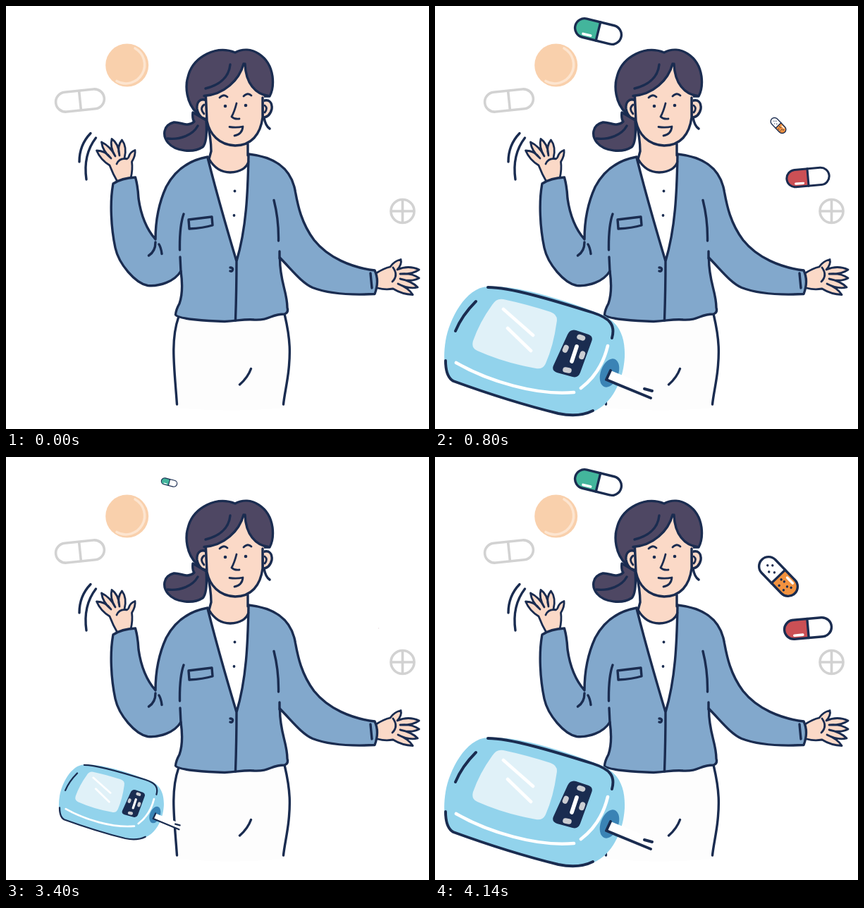
Recreate the animation shown at these times as an HTML page. Size 600 px wide and 600 px high, loop 6000 ms.

```html
<!DOCTYPE html>
<html lang="en">
<head>
<meta charset="utf-8">
<title>Health consultant</title>
<style>
  html, body { margin: 0; width: 100%; height: 100%; overflow: hidden; background: #fff; }
  svg { display: block; width: 100%; height: 100%; }
  .line { fill: none; stroke: #1a2c50; stroke-width: 3.4; stroke-linecap: round; stroke-linejoin: round; }
  .thin { stroke-width: 2.8; }
  .shine { fill: none; stroke: #fff; stroke-width: 4.6; stroke-linecap: round; }
  .small { stroke-width: 3.6; }
  .grey { fill: none; stroke: #d2d2d2; stroke-width: 3.6; }
  .navy { fill: #1a2c50; }
  .white { fill: #fff; }
  .skin { fill: #fbd9c7; }
  .hair { fill: #4e4763; }
  .blue { fill: #82a8cc; }
</style>
</head>
<body>
<svg viewBox="0 0 600 600">
  <defs>
    <g id="capsule">
      <rect class="white" x="-33.5" y="-13.5" width="67" height="27" rx="13.5"/>
      <path fill="currentColor" d="M0-13.5H-20a13.5 13.5 0 0 0 0 27H0z"/>
      <rect class="line" x="-33.5" y="-13.5" width="67" height="27" rx="13.5"/>
      <path class="line" d="M0-13.5V13.5"/>
    </g>
  </defs>

  <!-- Background ornaments -->
  <circle cx="171.7" cy="84" r="30.5" fill="#f9d0ac"/>
  <path d="M183 60A26.5 26.5 0 0 1 157 106.5" fill="none" stroke="#fde5d0" stroke-width="3.6" stroke-linecap="round"/>
  <g class="grey">
    <g transform="translate(105 134) rotate(-6)">
      <rect x="-34.5" y="-14" width="69" height="28" rx="14"/>
      <path d="M0-14V14"/>
    </g>
    <circle cx="562.5" cy="291" r="16.5"/>
    <path d="M546 291H579M562.5 275V307"/>
  </g>

  <!-- Skirt -->
  <path fill="#fdfdfd" d="M245 440C234 475 238 510 243 570Q320 577 393 570C399 535 403 505 402 475L395 438z"/>
  <path class="line" d="M244.5 442C233 475 239 515 242.5 565M395.5 439C404 475 403 495 401 515C399 535 395 550 393.5 565M347.5 514.5Q343 527 331.5 537"/>

  <!-- Hands -->
  <path class="line thin skin" d="M158 249Q152 239 147 226Q134 218 128.5 205Q141 205 149 216Q137 206 135.500 193Q148 199 155 213Q147 200 150 188.500Q160 195 161 212Q157 199 164.500 190Q172 200 168 216Q173 218 174 214Q176 207 183 204.500Q184 212 178.500 221Q180 232 177 244"/>
  <path class="line thin" d="M157 224Q161 215 171 217"/>
  <path class="line thin skin" d="M525 379Q536 372 545 370Q550 362 560 359.500Q562 366 555 374Q571 367 586 374Q576 381 559 380Q575 378 586 386Q575 392 559 387Q575 390 584 399Q571 402 556 394Q571 400 577 409.500Q562 409 549 401Q538 403 527 400"/>
  <path class="line thin" d="M549 371Q557 382 548 391"/>
  <path class="line" d="M120 180.5Q104 197 104 221M127.5 187Q109 211 114 246"/>

  <!-- Cardigan and shirt -->
  <path class="line blue" d="M286 214C258 219 239 234 227 257C216 281 212 305 212 331C198 315 191 294 188 273Q187 255 183.5 243Q164 244 152 252C147 278 149 315 155 343C160 366 183 393 201 396.5C218 398 239 391 248 376Q252 405 246 422Q241 431 240.5 438C244 444 285 447 310 447.500C332 446 338 444 352 445C375 446 375 437 395 437Q401 435 399 428C399 405 388 390 388.5 357C407 376 420 393 435 399.5C460 409 495 410 523 408.5Q530 390 523 375C490 371 457 357 437 332C419 308 414 283 410.5 264C405 229 380 214 344 210"/>
  <path class="white" d="M286 214Q301 275 327 362C342 315 343 265 344 210z"/>
  <path class="skin" d="M285 160Q292 190 291 208L288 219Q299 236 318 236Q340 235 344 219L342 190z"/>
  <path class="line" d="M285 163Q291 188 291 206L288 217Q299 236 318 236Q339 235 344 221M343 196V212M286 215Q301 275 327 362C341 315 343 265 344 211M327 362Q327 402 325.5 446"/>
  <path class="line" d="M252 295Q246 312 246.5 346M247 356L248 377M388 348V358M380 275.5Q387 303 386.5 333M212 335Q212 348 202.5 354M217 338Q220 343 221 351.5M517 379L519 400M259 303Q276 301 292 299L293 311Q280 315 260 316zM318 371Q322 371 321.5 374Q321 377 318 376"/>

  <!-- Head -->
  <path class="line hair" d="M265 151Q264 160 267 164C257 173 248 164 238 165C222 169 222 185 230 194C240 206 265 209 279 200C285 194 285 178 284 162z"/>
  <path class="line" d="M229 188C247 190 265 183 272 170M366 158Q368 170 374 174"/>
  <path class="line hair" d="M271 152C256 138 253 114 259 97C267 72 298 55 325 66C347 54 374 71 378 100Q380 117 374 128L350 128L300 150z"/>
  <path class="line skin" d="M284 134C275 130 270 137 271 146Q274 160 285 160zM364 135C373 131 378 137 377 146Q374 158 364 158z"/>
  <path class="line thin" d="M281 140Q274 145 281 153M367 141Q372 145 367 151"/>
  <path class="skin" d="M284 127Q330 118 338 81Q344 118 366 128L364 158C361 182 348 198 325 198C302 197 289 182 285 163z"/>
  <path class="line" d="M281 127.5C309 126 331 105 337 82M339 82C340 110 354 125 372 127.5M318 83C316 103 300 113 283 117M283.5 129L285 163C289 182 302 197 325 198C348 198 361 182 364 158V130"/>
  <path class="line thin" d="M303 130Q309 124 314 129M337 128Q343 122 348 127M327 138Q324 150 320 157Q324 161 331 160M317 171.5Q327 173 336 171Q335 182 324 184"/>
  <g class="navy">
    <circle cx="311" cy="142" r="2.3"/><circle cx="340" cy="141" r="2.3"/>
    <circle cx="324.5" cy="262.5" r="1.9"/><circle cx="323.5" cy="297" r="1.9"/>
  </g>

  <!-- Items that pop in -->
  <g class="pop" data-x="161" data-y="489.5" data-start="0" data-span="700">
    <g transform="translate(-161 -489.5)">
      <path fill="#92d3ec" d="M75 398C120 396 185 418 235 437C262 448 270 470 269 498C267 535 248 566 225 575Q204 584 175 578C130 567 70 548 26 532C13 525 11 500 15 475C20 445 43 399 75 398z"/>
      <ellipse fill="#3a83b5" cx="247.5" cy="520.5" rx="12.5" ry="21" transform="rotate(20 247.5 520.5)"/>
      <path class="white" d="M249 517L308 541L306 556L243 530z"/>
      <path fill="#e0f1f8" d="M97 416Q130 423 164 434Q175 438 172.500 449Q168 482 157 507Q153 516 143 514Q98 506 60 489Q51 485 54 475Q63 449 81 424Q87 414 97 416z"/>
      <path class="navy" d="M200 460L218 466Q225 469 222 476L206 520Q203 528 195 526L173 520Q165 517 168 510L188 466Q192 458 200 460z"/>
      <path class="shine" d="M97 430L139 467M103 457L136 489M30 506C75 532 145 553 197 548M245 482Q236 520 207 542"/>
      <path class="shine" d="M201 483L194 504" style="stroke-width:5.6"/>
      <path d="M205 469.5L209.5 471M186 484.5L184.5 488M209.5 493L208 497.5M185 516L190 517" fill="none" stroke="#cbcdd2" stroke-width="7.5" stroke-linecap="round"/>
      <path class="line" d="M75 399C107 399 167 417 224 435C249 443 256 453 251 471M58 419Q38 439 29 461M15 503Q15 526 26 532C70 548 130 567 175 578Q204 584 224 574M249 517L243 530L306 556M297 543L308 546" style="stroke-width:3.9"/>
    </g>
  </g>
  <g class="pop" data-x="231.5" data-y="36" data-start="133" data-span="600">
    <g transform="rotate(14)" color="#43b59c">
      <use href="#capsule"/><path class="shine small" d="M-20 8.5H-9"/>
    </g>
  </g>
  <g class="pop" data-x="529" data-y="243" data-start="333" data-span="600">
    <g transform="rotate(-5)" color="#cb5055">
      <use href="#capsule"/><path class="shine small" d="M-20 8.5H-8"/>
    </g>
  </g>
  <g class="pop" data-x="487" data-y="169.5" data-start="533" data-span="600">
    <g transform="rotate(226)" color="#f2923f">
      <use href="#capsule"/><path class="shine small" d="M-21 8H-10"/>
      <path class="line" d="M22 0h0M17 5h0M14-5h0M8 0h0M-6 0h0M-10-8h0M-11 1h0M-19-1h0M-24 2h0M-19-8h0"/>
    </g>
  </g>
</svg>
<script>
  const LOOP = 6000, SECOND_PASS = 3020, STEP = 20;
  const items = [...document.querySelectorAll('.pop')];

  const easeInOut = p => p < 0.5 ? 2 * p * p : 1 - 2 * (1 - p) ** 2;

  function draw(now) {
    const t = Math.floor(now % LOOP / STEP) * STEP;
    const local = t < SECOND_PASS ? t : t - SECOND_PASS;
    for (const item of items) {
      const { x, y, start, span } = item.dataset;
      const p = Math.min(1, Math.max(0, (local - start) / span));
      item.setAttribute('transform', `translate(${x} ${y}) scale(${easeInOut(p)})`);
    }
  }

  let began;
  function tick(now) {
    began ??= now;
    draw(now - began);
    requestAnimationFrame(tick);
  }
  draw(0);
  requestAnimationFrame(tick);
</script>
</body>
</html>
```
